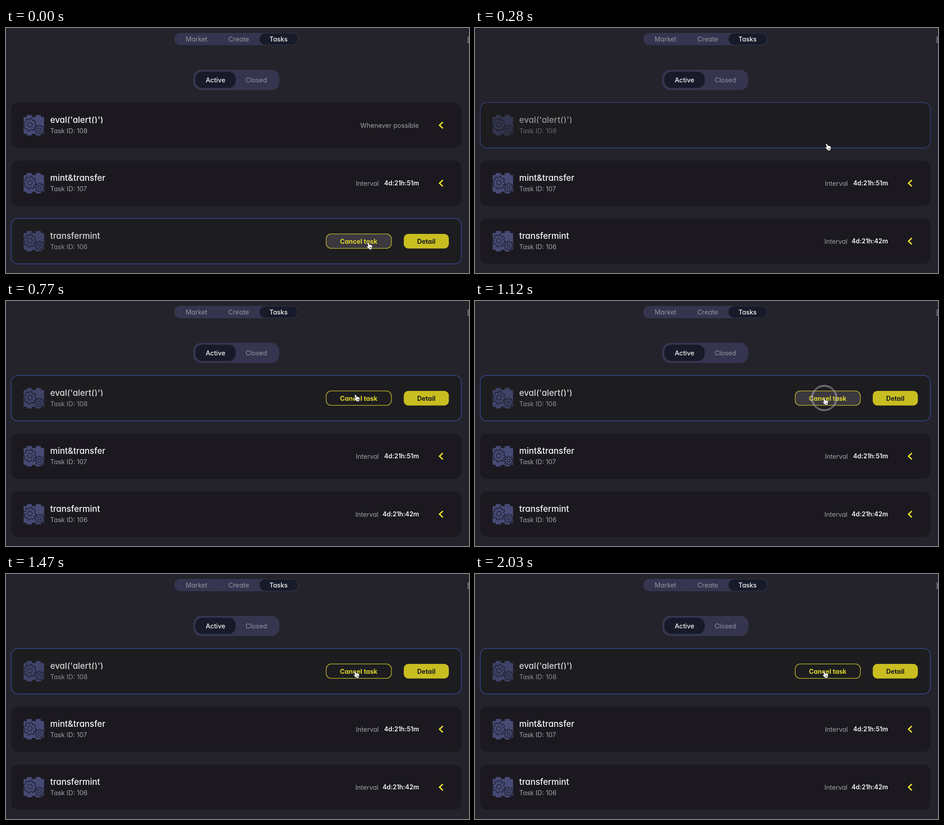
These frames come from a looping animation (1027x545 px, 2520 ms). An HTML page:

```html
<!DOCTYPE html>
<html lang="en">
<head>
<meta charset="utf-8">
<title>Task list</title>
<style>
  html, body { margin: 0; width: 100%; height: 100%; overflow: hidden; background: #24232b; }
  svg { display: block; width: 100%; height: 100%; }
  text {
    font-family: Inter, "Open Sans", sans-serif;
    font-size: 14.4px;
    font-feature-settings: "cv11";
    fill: #a3a2a9;
    white-space: pre;
  }
  .mid { text-anchor: middle; }
  .end { text-anchor: end; }
  .tab { fill: #9696a3; }
  .on { fill: #f4f4f6; font-weight: 500; }
  .title { font-size: 18.8px; font-weight: 500; fill: #f6f6f8; }
  .time { font-size: 14px; font-weight: 600; fill: #f4f4f6; }
  .btn { font-size: 14.3px; font-weight: 700; }
</style>
</head>
<body>
<svg id="stage" viewBox="0 0 1027 545" preserveAspectRatio="none"></svg>
<script>
const LOOP = 2520, STEP = 70, ROW_GAP = 129;
const ROWS = [
  { title: "eval('alert()')", id: 108 },
  { title: "mint&transfer", id: 107, time: "4d:21h:51m", labelEnd: 827 },
  { title: "transfermint", id: 106, time: "4d:21h:42m", labelEnd: 826 }
];
// pointer keys: time, x, y
const PATH = [
  [0, 806, 485], [70, 799, 427], [140, 792, 367], [210, 787, 314], [280, 783, 265],
  [350, 780, 238], [420, 779, 223], [490, 778, 217], [560, 778, 216],
  [770, 778, 216], [980, 777, 224], [LOOP, 777, 224]
];

const stage = document.getElementById("stage");

function add(parent, tag, attrs = {}, text) {
  const node = document.createElementNS("http://www.w3.org/2000/svg", tag);
  set(node, attrs);
  if (text !== undefined) node.textContent = text;
  parent.appendChild(node);
  return node;
}

function set(node, attrs) {
  for (const key in attrs) node.setAttribute(key, attrs[key]);
}

const box = (parent, x, y, width, height, rx, fill, more = {}) =>
  add(parent, "rect", { x, y, width, height, rx, fill, ...more });

const label = (parent, x, y, cls, text, more = {}) =>
  add(parent, "text", { x, y, class: cls, ...more }, text);

const clamp = v => Math.max(0, Math.min(1, v));
const mix = (a, b, k) => a + (b - a) * k;

function gear(cx, cy, r, teeth, turn) {
  const points = [];
  const pitch = 2 * Math.PI / teeth;
  for (let i = 0; i < teeth; i++) {
    for (const [part, size] of [[-.32, .79], [-.2, 1], [.2, 1], [.32, .79]]) {
      const a = (i + part) * pitch + turn;
      points.push((cx + r * size * Math.cos(a)).toFixed(2) + " " + (cy + r * size * Math.sin(a)).toFixed(2));
    }
  }
  return "M" + points.join("L") + "Z";
}

function drawIcon(parent) {
  const fill = "#464a75";
  const line = { fill: "none", stroke: "#1c1b26", "stroke-width": 1.4, "stroke-linejoin": "round" };
  const clip = { "clip-path": "url(#block)" };
  box(parent, 39, 198, 45.5, 37.5, 2, fill);
  for (const x of [46, 66]) {
    box(parent, x, 193.5, 11.5, 8, 1.5, fill);
    box(parent, x, 231, 11.5, 8, 1.5, fill);
  }
  const art = add(parent, "g", clip);
  add(art, "path", { d: gear(53, 215, 14.2, 8, .2), ...line });
  add(art, "circle", { cx: 53, cy: 215, r: 5.3, ...line });
  add(art, "path", { d: gear(74.5, 226, 10, 8, 0), ...line, fill });
  add(art, "circle", { cx: 74.5, cy: 226, r: 3.5, ...line });
}

function drawRow(data, index) {
  const row = add(stage, "g", { transform: `translate(0 ${index * ROW_GAP})` });
  const card = box(row, 11.5, 165.7, 998.5, 101, 15, "#1b191f", { "stroke-width": 1.2 });

  const info = add(row, "g");
  drawIcon(info);
  label(info, 98, 211, "title", data.title, { "clip-path": "url(#line)" });
  label(info, 98, 233.5, "", "Task ID: " + data.id);

  const idle = add(row, "g");
  if (data.time) {
    label(idle, data.labelEnd, 221.5, "end", "Interval");
    label(idle, 916, 221.3, "end time", data.time);
  } else {
    label(idle, 916, 221.5, "end", "Whenever possible");
  }
  add(idle, "path", {
    d: "M969 209.2L961.6 216.2L969 223.2", fill: "none", stroke: "#f3e72a", "stroke-width": 2.9
  });

  const actions = add(row, "g");
  const cancel = box(actions, 710.2, 200.2, 144.6, 32, 11, "#3b383f", { stroke: "#cbc22c", "stroke-width": 1.3 });
  label(actions, 782.3, 221.5, "mid btn", "Cancel task", { fill: "#ded62d", style: "fill:#ded62d" });
  box(actions, 882.3, 200, 100, 32.5, 10, "#c9be20");
  label(actions, 932.3, 221.5, "mid btn", "Detail", { style: "fill:#1a1b20" });

  return { card, info, idle, actions, cancel };
}

function drawHeader() {
  box(stage, 373, 11, 275.5, 27.3, 13.6, "#35354f");
  box(stage, 562.3, 12, 85, 25.2, 12.6, "#171a28");
  label(stage, 422.5, 30, "mid tab", "Market");
  label(stage, 516.3, 30, "mid tab", "Create");
  label(stage, 604.5, 30, "mid on", "Tasks");
  label(stage, 1023, 30, "tab", "E", { "text-decoration": "underline" });

  box(stage, 415.3, 93, 191, 45, 18, "#35354f");
  box(stage, 420, 97.3, 89.5, 36, 15.5, "#171a28");
  label(stage, 464.7, 121, "mid on", "Active");
  label(stage, 555.3, 121, "mid tab", "Closed");
}

const defs = add(stage, "defs");
box(add(defs, "clipPath", { id: "line" }), 90, 190, 300, 22, 0, "#000");
box(add(defs, "clipPath", { id: "block" }), 39, 198, 45.5, 38, 2, "#000");

box(stage, 0, 0, 1027, 545, 0, "#24232b");
drawHeader();
const rows = ROWS.map(drawRow);

const ripple = add(stage, "g", { fill: "none", stroke: "#c9c9cd", "stroke-width": 1 });
for (const r of [28.3, 26]) add(ripple, "circle", { cx: 774.7, cy: 215.8, r });

const hand = add(stage, "g");
add(hand, "path", {
  d: "M-3.9 -7.6C-2.5 -8.2 -1.6 -7.4 -1.2 -6.2L-.2 -3.2C.8 -3.9 1.9 -3.5 2.3 -2.7" +
     "C3.3 -3.2 4.2 -2.8 4.6 -1.9C5.6 -2.2 6.3 -1.6 6.5 -.6C7 1.7 6.8 3.4 5.9 5.1L5.8 7.6" +
     "L-.3 8L-1 6.3C-2.4 5.1 -4.2 3.3 -5.8 1.8C-6.9 .7 -5.6 -.9 -4.1 -.1L-2.8 .7L-4.8 -5.4C-5.1 -6.4 -4.8 -7.2 -3.9 -7.6Z",
  fill: "#fff", stroke: "#111", "stroke-width": 1, "stroke-linejoin": "round"
});
add(hand, "path", { d: "M.6 2.2L1.2 5.5M2.7 2L3.1 5.3M4.6 1.8L4.7 5", stroke: "#222", "stroke-width": .8 });

function pointerAt(t) {
  const i = Math.max(1, PATH.findIndex(key => key[0] >= t));
  const [t0, x0, y0] = PATH[i - 1], [t1, x1, y1] = PATH[i];
  const k = (t - t0) / (t1 - t0);
  return [mix(x0, x1, k), mix(y0, y1, k)];
}

// How far a row's hover has come: -1 while idle, otherwise 0 to 1
function hoverAt(index, t) {
  if (index === 2) return t < 70 ? 1 : -1;
  if (index === 1) return t >= 140 && t < 280 ? (t - 140) / 280 : -1;
  return t >= 280 ? clamp((t - 280) / 280) : -1;
}

function render(time) {
  const t = Math.floor((time % LOOP) / STEP) * STEP;

  rows.forEach((row, i) => {
    const k = hoverAt(i, t), hot = k >= 0;
    set(row.card, {
      fill: hot ? "#1d1d20" : "#1b191f",
      stroke: hot ? "#4055b4" : "none",
      "stroke-opacity": mix(.72, .95, clamp(k))
    });
    row.info.setAttribute("opacity", hot ? mix(.55, .85, k) : 1);
    row.idle.setAttribute("opacity", hot ? 0 : 1);
    row.actions.setAttribute("opacity", clamp(k));
  });

  const pressed = t >= 1120 ? clamp((1470 - t) / 210) : 0;
  rows[0].cancel.setAttribute("fill-opacity", pressed);
  ripple.setAttribute("opacity", t >= 1120 ? clamp(1 - (t - 1120) / 280) : 0);

  const [x, y] = pointerAt(t);
  hand.setAttribute("transform", `translate(${x} ${y})`);
}

function tick() {
  render(performance.now());
  requestAnimationFrame(tick);
}
tick();
</script>
</body>
</html>
```
